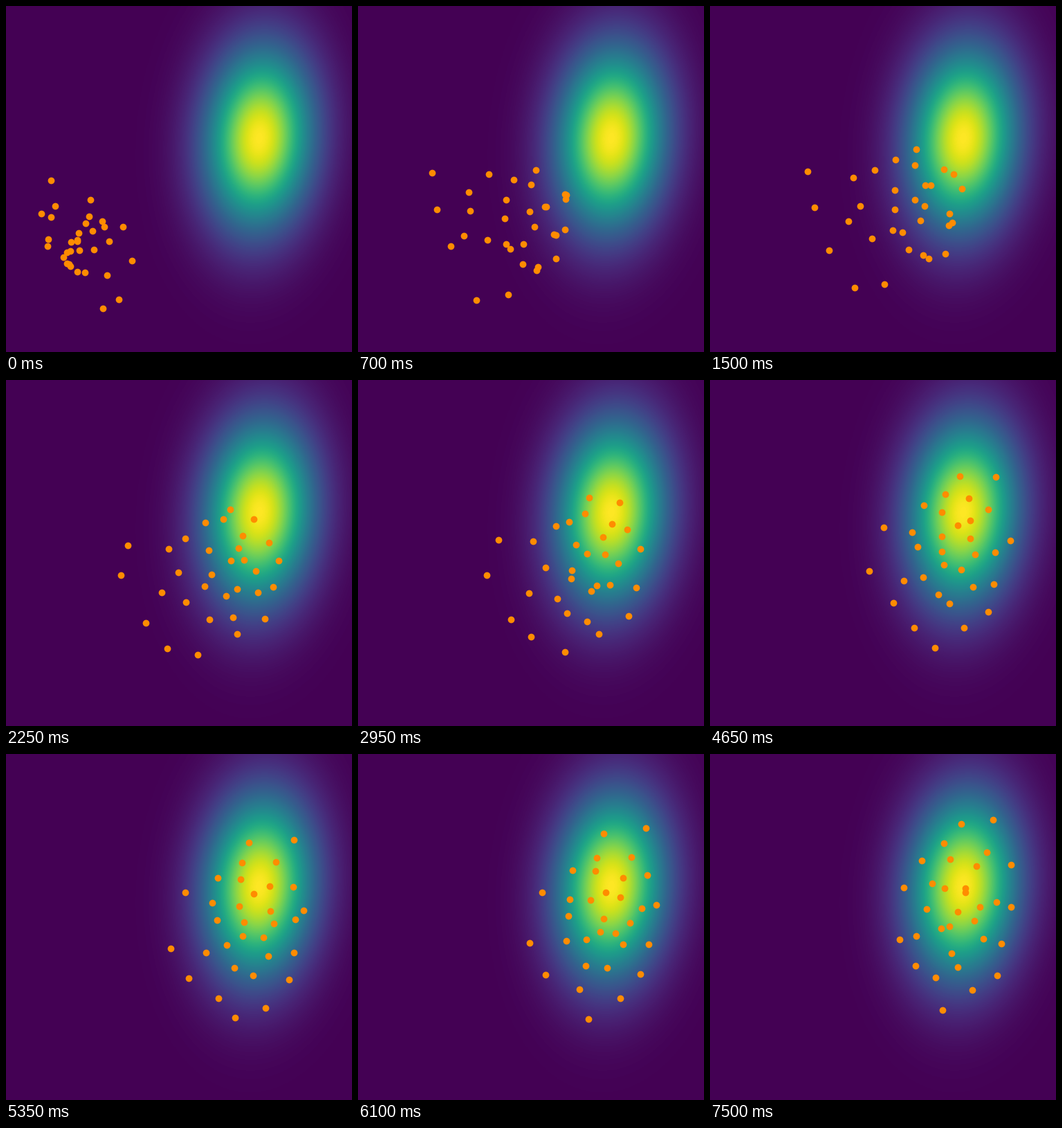
Recreate the animation shown at these times as a matplotlib script. Size 500x500 px, loop 7550 ms.

```python
import matplotlib.pyplot as plt
import numpy as np
from matplotlib.animation import FuncAnimation

FRAMES, INTERVAL = 151, 50
COUNT = 32
STEP, WIDTH, NOISE = 0.36, 0.5, 0.03

START_MEAN, START_STD = np.array([-2.83, -1.86]), np.array([0.66, 0.78])
MEAN = np.array([2.32, 1.18])
PREC = np.linalg.inv([[1.15, 0.15], [0.15, 3.2]])


def start_cloud(rng):
    """Normal cloud with exactly the wanted mean and spread."""
    pts = rng.normal(size=(COUNT, 2))
    pts = (pts - pts.mean(0)) / pts.std(0)
    return START_MEAN + START_STD * pts


def svgd_step(pts):
    """One Stein variational step towards the Gaussian."""
    diff = pts[:, None] - pts[None]
    kernel = np.exp(-(diff ** 2).sum(-1) / WIDTH)
    score = -(pts - MEAN) @ PREC
    repulsion = (2 / WIDTH * kernel[..., None] * diff).sum(1)
    return STEP * (kernel @ score + repulsion) / COUNT


def build_path():
    rng = np.random.default_rng(4)
    path = [start_cloud(rng)]
    for _ in range(FRAMES - 1):
        pts = path[-1]
        path.append(pts + svgd_step(pts) + rng.normal(0, NOISE, pts.shape))
    return np.array(path)


path = build_path()

fig = plt.figure(figsize=(5, 5), dpi=100)
ax = fig.add_axes([0, 0, 1, 1])
ax.axis("off")

axis = (np.arange(500) + 0.5) / 50 - 5
offset = np.stack(np.meshgrid(axis, axis), -1) - MEAN
density = np.exp(-0.5 * ((offset @ PREC) * offset).sum(-1))
ax.imshow(density, extent=(-5, 5, -5, 5), origin="lower", cmap="viridis",
          vmin=0, vmax=1)
dots, = ax.plot([], [], "o", color="darkorange", markersize=6)
ax.set(xlim=(-5, 5), ylim=(-5, 5))


def update(frame):
    dots.set_data(path[frame, :, 0], path[frame, :, 1])
    return dots,


anim = FuncAnimation(fig, update, frames=FRAMES, interval=INTERVAL,
                     repeat=True, repeat_delay=0, blit=False)
plt.show()
```
